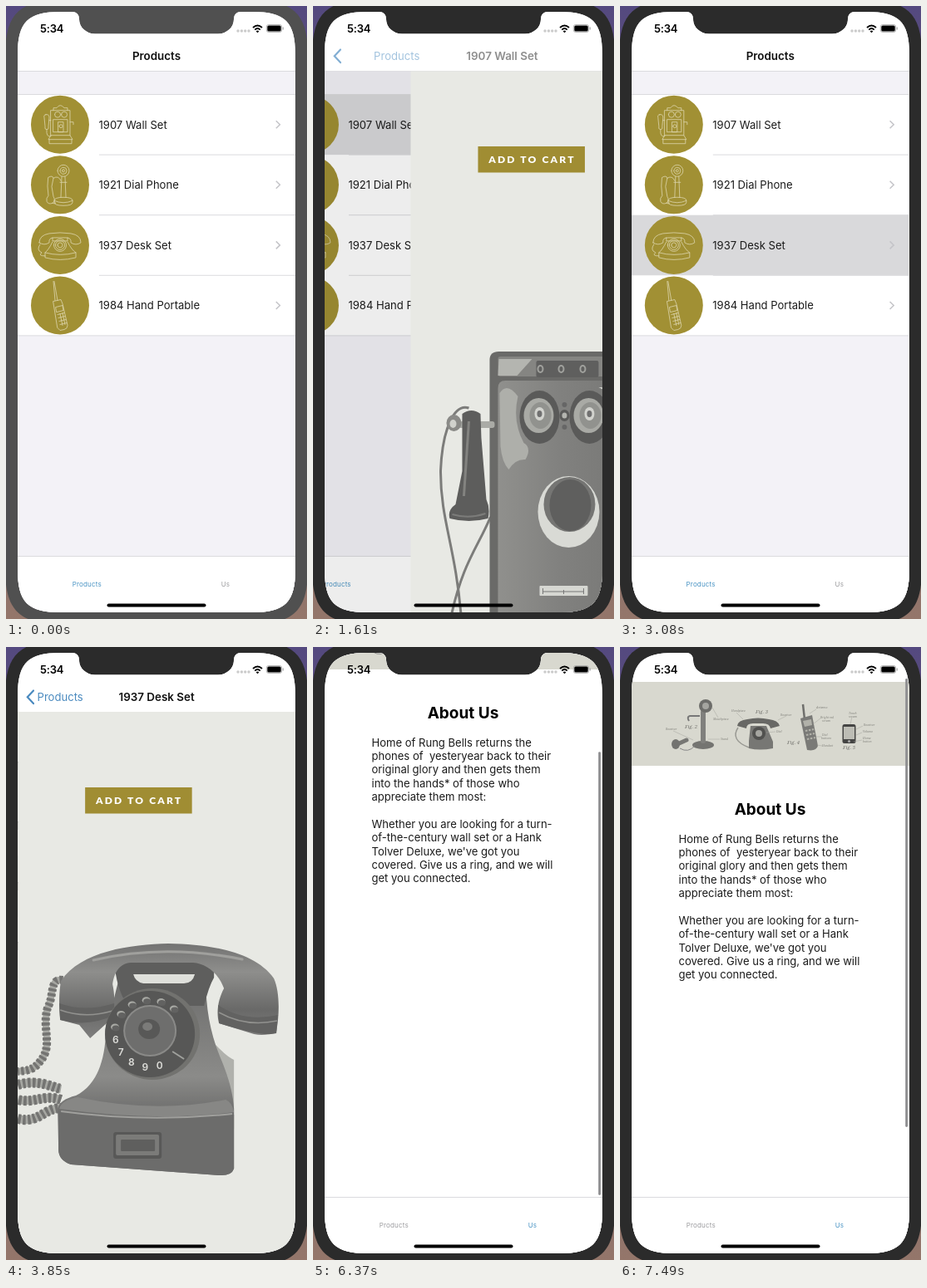
These frames come from a looping animation (362x738 px, 7560 ms). An HTML page:

```html
<!DOCTYPE html>
<html lang="en">
<head>
<meta charset="utf-8">
<title>Phone shop</title>
<style>
html, body { margin: 0; width: 100%; height: 100%; overflow: hidden; }
svg { display: block; width: 362px; height: 738px; }
text { font-family: Inter, Roboto, sans-serif; white-space: pre; }
.body { font-size: 13.05px; fill: #1b1b1b; }
.title { font-size: 13.4px; font-weight: 600; fill: #111; text-anchor: middle; }
.back { font-size: 13.1px; fill: #4a8abf; }
.head { font-size: 19px; font-weight: 700; text-anchor: middle; }
.tab { font-size: 8px; letter-spacing: .15px; text-anchor: middle; }
.clock { font-size: 13px; font-weight: 600; letter-spacing: -.2px; }
.cart { font: 900 12px Lato, sans-serif; letter-spacing: 2.2px; fill: #fff; text-anchor: middle; }
.digit { font-size: 12px; font-weight: 600; fill: #dcdcd8; text-anchor: middle; }
.note { font: italic 3.4px "Noto Serif", serif; fill: #85857f; }
.fig { font: italic 6px "Noto Serif", serif; fill: #73736e; }
.icon { fill: none; stroke: #ded6ae; stroke-width: .8; stroke-linejoin: round; stroke-linecap: round; }
.chev { fill: none; stroke: #c4c4c8; stroke-width: 1.5; }
.hair { stroke: #dbdbde; stroke-width: 1; }
.lead { fill: none; stroke: #a3a39c; stroke-width: .5; }
</style>
</head>
<body>
<svg viewBox="0 0 362 738" xmlns="http://www.w3.org/2000/svg">
<defs>
  <clipPath id="screen"><path d="M66 7H79Q88 7 88 16A19 17.500 0 0 0 107 33.500H255A19 17.500 0 0 0 274 16Q274 7 283 7H296C336 7 348 19 348 59V678C348 718 336 730 296 730H66C26 730 14 718 14 678V59C14 19 26 7 66 7Z"/></clipPath>
  <linearGradient id="desk" x2="0" y2="1"><stop stop-color="#54497f"/><stop offset="1" stop-color="#94766a"/></linearGradient>
  <linearGradient id="wood"><stop stop-color="#90908d"/><stop offset=".45" stop-color="#81817f"/><stop offset="1" stop-color="#777775"/></linearGradient>
  <linearGradient id="shell" x2="0" y2="1"><stop stop-color="#6c6c6b"/><stop offset=".5" stop-color="#8b8b89"/><stop offset=".68" stop-color="#6e6e6d"/><stop offset="1" stop-color="#757574"/></linearGradient>
  <linearGradient id="grip" x2="0" y2="1"><stop stop-color="#737372"/><stop offset=".3" stop-color="#8e8e8c"/><stop offset=".7" stop-color="#696968"/><stop offset="1" stop-color="#7e7e7d"/></linearGradient>
</defs>
<rect width="362" height="738" fill="url(#desk)"/>
<path id="bezel" d="M65 -7H297C346 -7 363 10 363 59V678C363 727 346 744 297 744H65C16 744 -1 727 -1 678V59C-1 10 16 -7 65 -7Z"/>
<g clip-path="url(#screen)">
  <rect width="362" height="738" fill="#fff"/>
  <g id="shop">
    <g id="home">
      <rect x="14" y="78" width="434" height="660" fill="#f3f2f7"/>
      <g id="list"></g>
      <g id="bar">
        <rect x="14" y="662" width="334" height="76" fill="#fff"/>
        <path class="hair" d="M14 662.500H348"/>
        <text id="tabA" class="tab" x="97.300" y="699">Products</text>
        <text id="tabB" class="tab" x="264" y="699">Us</text>
      </g>
      <rect id="dim" x="14" y="78" width="334" height="660"/>
    </g>
    <g id="wall"></g>
    <g id="rotary"></g>
    <rect x="14" y="0" width="334" height="78" fill="#fff"/>
    <path id="navLine" class="hair" d="M14 78.500H348"/>
    <text id="title" class="title" x="181" y="65">Products</text>
    <text id="item" class="title" x="181" y="65"></text>
    <text id="back" class="back" x="37.500" y="65">Products</text>
    <path id="arrow" d="M33 52.500L25.800 60.300L33 68.100" fill="none" stroke="#4a8abf" stroke-width="2.200" stroke-linecap="round"/>
  </g>
  <g id="about">
    <rect width="362" height="738" fill="#fff"/>
    <g id="page"></g>
    <rect id="thumb" x="343.200" width="2.800" rx="1.400" fill="#8f8f91"/>
    <g id="barCopy"></g>
  </g>
  <text class="clock" x="41" y="31.500">5:34</text>
  <g id="status"></g>
  <rect x="121.500" y="719.500" width="119" height="4" rx="2" fill="#000"/>
</g>
</svg>
<script>
const LOOP = 7560;
const $ = id => document.getElementById(id);
const fill = (id, markup) => { $(id).innerHTML = markup; };
const text = (cls, x, y, s) => `<text class="${cls}" x="${x}" y="${y}">${s}</text>`;
const ell = (x, y, rx, ry, c) => `<ellipse cx="${x}" cy="${y}" rx="${rx}" ry="${ry}" fill="${c}"/>`;
const box = (x, y, w, h, r, c) => `<rect x="${x}" y="${y}" width="${w}" height="${h}" rx="${r}" fill="${c}"/>`;
const path = (d, c) => `<path d="${d}" fill="${c}"/>`;
const line = (d, c, w, more = '') => `<path d="${d}" fill="none" stroke="${c}" stroke-width="${w}" ${more}/>`;
const ring = (x, y, r) => `M${x - r} ${y}a${r} ${r} 0 1 0 ${2 * r} 0a${r} ${r} 0 1 0 ${-2 * r} 0`;

// Product list
const ROW = 72.6, TOP = 106.5;
const icons = [
  'M-11 -17H12V13H-11ZM-8 -17V-20H-4Q0 -26 5 -20H9V-17M-8 -6H9V9H-8ZM-2 -3H4V9H-2ZM-11 13L-14 18H15L12 13M-13 18V23H14V18M-17 -12Q-20 -12 -19 -8L-18 2Q-19 6 -16 6Q-13 6 -14 2L-13 -8Q-13 -13 -17 -12ZM-13 -5H-11M-16 6Q-17 16 -11 14M12 -3H16V0' + ring(-3, -12, 3.5) + ring(5, -12, 3.5) + ring(1, 2, 2),
  'M2 -10L1 15M6 -10L7 15M-7 19Q-7 15 4 15Q15 15 15 19V21Q15 25 4 25Q-7 25 -7 21ZM-7 19Q4 24 15 19M0 -3H8M-14 -9Q-9 -12 -8 -8L-10 2L-8 14Q-5 19 -9 22Q-14 24 -16 20Q-17 16 -14 13L-15 2ZM-8 -8Q-2 -12 1 -5M-9 22Q-3 24 -7 20' + ring(4, -17, 7) + ring(4, -17, 4) + ring(4, -17, 1.5),
  'M-25 -3Q-25 -12 -13 -14Q0 -16 13 -14Q25 -12 25 -3Q19 1 13 -3Q14 -9 7 -9H-7Q-14 -9 -13 -3Q-19 1 -25 -3ZM-9 -9V-5H9V-9M-9 -4Q-14 6 -18 9V15Q0 20 19 15V9Q14 6 9 -4M-18 9Q0 14 19 9M-24 -1Q-29 6 -22 9Q-27 13 -18 13' + ring(0, 0, 7.5) + ring(0, 0, 3) + ring(0, 0, 5.5),
  'M-8 -29L-6 -6M-7 -29L-3 -6M-8 -5L1 -7L3 -2L9 24Q9 28 5 29L0 30L-3 27ZM-5 2L3 0L4 6L-4 8ZM-3 11L5 9M-2 15L6 13M-1 19L7 17M0 23L8 21M0 10L3 24M3 9L6 23'
];
const names = ['1907 Wall Set', '1921 Dial Phone', '1937 Desk Set', '1984 Hand Portable'];

const rowMarkup = (name, i) => {
  const y = TOP + ROW * i, mid = y + 36.2;
  return `<rect id="hl${i}" x="14" y="${y}" width="334" height="${ROW}" fill="#d9d9db"/>` +
    ell(65, mid, 35, 35, '#a19034') +
    `<path class="icon" d="${icons[i]}" transform="translate(65 ${mid})"/>` +
    text('body', 111.5, mid + 4.8, name) +
    `<path class="chev" d="M324.800 ${mid - 4.5}l4.600 4.500l-4.600 4.500"/>` +
    `<path class="hair" d="M${i < 3 ? 112 : 14} ${y + ROW}H348"/>`;
};
fill('list', box(14, TOP, 334, ROW * 4, 0, '#fff') + names.map(rowMarkup).join('') +
  `<path class="hair" d="M14 ${TOP}H348"/>`);

// Product pages
const sheet = art => box(14, 78, 334, 660, 0, '#e8e9e4') + art +
  box(95, 169, 128.5, 31.5, 0, '#a08d33') + text('cart', 160, 189.2, 'ADD TO CART');

const bell = x => ell(x, 495, 24, 32, '#5a5a59') + ell(x - 1, 493, 18, 21, '#a9aaa5') +
  ell(x + 1, 493, 13, 16, '#91928e') + ell(x, 491, 6, 8, '#d2d3ce') + ell(x, 491, 3, 4, '#707070');

fill('wall', sheet(
  line('M84 484C66 478 52 510 50 560C50 620 68 650 75 738', '#7c7c7a', 3) +
  line('M110 615C96 650 76 670 62 738', '#7c7c7a', 3) +
  line('M284 646L292 648', '#777', 4) + box(288, 643, 18, 12, 4, '#80807e') +
  path('M109 738V426Q109 416 120 416H273Q284 416 284 427V738Z', '#6a6a68') +
  box(119, 422, 160, 24, 3, '#858582') + path('M120 425H160L142 445H119Z', '#b4b5b0') +
  box(165, 427, 75, 20, 2, '#5f5f5e') +
  [170, 195, 221].map(x => ell(x, 437, 4, 5, '#a0a19d') + ell(x, 437, 2, 3, '#5f5f5e')).join('') +
  path('M119 738V460Q119 451 128 451H282V738Z', 'url(#wood)') +
  path('M121 466Q130 452 143 470Q136 500 150 526Q160 532 152 546Q140 545 132 558Q124 550 122 530Z', '#aeafaa') +
  path('M240 459L261 460V464L246 462Z', '#dcddd8') +
  bell(169) + bell(229) +
  ell(199, 493, 6, 7, '#5a5a59') + ell(199, 493, 3, 3.5, '#b4b5b0') +
  ell(199, 480, 3, 3, '#666') + ell(199, 507, 3, 3, '#666') +
  ell(204, 609, 37, 43, '#d9dad5') + ell(205, 600, 31, 33, '#757573') + ell(206, 601, 25, 31, '#5f5f5e') +
  box(169, 698, 58, 12, 1, '#d6d7d2') + line('M173 705H222M173 701V708M198 703V708M222 701V708', '#777', 1) +
  box(58, 500, 57, 8, 3, '#aaaba6') + ell(66, 502, 9, 10, '#8a8a87') + ell(65, 503, 4, 5, '#d0d1cc') +
  path('M76 491Q87 483 98 491L99 520L105 594Q110 605 107 617Q84 623 61 617Q58 607 68 600L76 560Z', '#5d5d5c') +
  line('M84 500L78 590', '#838380', 3) + line('M64 612Q84 618 104 611', '#7c7c7a', 2)
));

const coil = (d, w) => line(d, '#a6a7a2', w - 2) + line(d, '#747472', w, 'stroke-dasharray="3.500 2.500"');
const onDial = (deg, r) => {
  const a = deg * Math.PI / 180;
  return [173 + r * Math.cos(a), 466 + (r - 2) * Math.sin(a)];
};
const numeral = (s, i) => {
  const [x, y] = onDial(170 - i * 24, 42);
  return text('digit', x, y + 4, s);
};
const hole = (_, i) => {
  const [x, y] = onDial(192 + i * 24, 43);
  return ell(x, y, 5, 4, '#a9aaa5') + ell(x + 1, y + 1.5, 4.5, 3.5, '#626261');
};
fill('rotary', sheet(
  coil('M68 401C52 398 58 420 50 434C42 460 58 480 40 500C32 510 24 510 14 511', 10) +
  coil('M14 527C40 520 55 530 66 532', 12) + coil('M66 545C45 538 35 550 14 545', 12) +
  coil('M14 568C40 574 45 555 66 555', 12) +
  path('M238 465C255 482 264 492 274 497V580H236Z', '#b0b1ac') +
  path('M136 398H240C240 440 247 470 260 500C268 520 273 538 274 556V628Q271 637 256 636L78 623Q63 618 63 605L62 556Q64 545 84 540C108 528 119 500 120 462Z', 'url(#shell)') +
  path('M64 556Q66 546 86 542Q180 562 264 545Q272 548 274 560Q180 572 64 556Z', '#878785') +
  path('M64 560Q170 574 274 563V628Q271 637 256 636L78 623Q63 618 63 605Z', '#6c6c6b') +
  line('M66 559Q170 573 272 562', '#a0a09d', 2) +
  path('M130 378H250V398Q244 408 238 432H146Q132 410 130 378Z', '#5e5e5d') +
  path('M153 394H227Q224 405 214 405H165Q155 403 153 394Z', '#dfe0db') +
  path('M66 402C90 366 150 358 195 357C250 358 300 368 322 399C329 415 329 440 325 463Q312 469 298 466L256 453C252 438 256 422 262 411C255 392 240 381 225 380H150C136 381 130 392 128 406C132 424 130 440 122 452L101 471L88 455L65 449C63 430 64 412 66 402Z', 'url(#grip)') +
  path('M64 429Q95 440 130 429V443Q100 458 65 449Z', '#626261') +
  path('M255 431Q285 452 327 443L325 465Q310 470 256 453Z', '#626261') +
  line('M65 437Q95 448 128 438M256 440Q288 458 326 450', '#92928f', 1.5) +
  line('M105 377Q190 357 284 376', '#a0a09d', 3, 'stroke-linecap="round"') +
  ell(176, 466, 57, 55, '#72726f') + ell(173, 466, 54, 52, '#575756') +
  Array.from({ length: 6 }, hole).join('') + ['6', '7', '8', '9', '0'].map(numeral).join('') +
  ell(173, 462, 32, 31, '#8a8a88') + ell(173, 462, 30, 29, '#6e6e6d') +
  ell(172, 460, 13, 12, '#585857') + ell(170, 457, 6, 5, '#7b7b79') +
  line('M200 487L214 496', '#a0a19d', 2) +
  box(129, 584, 58, 32, 3, '#585857') + box(132, 587, 52, 25, 2, '#7b7b79') + box(138, 593, 41, 14, 1, '#5f5f5e')
));

// About page
const note = (x, y, s) => text('note', x, y, s);
const banner = box(14, 42, 334, 101, 0, '#d8d8cf') +
  ell(100, 118, 13, 5, '#747471') + box(97, 76, 6, 40, 2, '#80807d') + ell(103, 71, 8, 8, '#6d6d6a') +
  ell(103, 71, 4, 4, '#a5a5a0') + line('M96 83H84Q80 84 83 89', '#777', 2) +
  line('M69 117L80 112', '#777774', 5, 'stroke-linecap="round"') + ell(67, 117, 5, 6, '#737370') +
  line('M72 122Q82 128 90 119', '#888', 1) +
  path('M141 95Q142 88 153 87Q166 84 179 87Q190 88 192 95L181 98Q180 92 172 92H160Q152 92 152 98Z', '#686865') +
  path('M157 95H176L184 114V122Q168 125 155 122V113Z', '#777774') +
  ell(167, 104, 8, 8, '#51514f') + ell(167, 104, 4, 4, '#a5a5a0') +
  line('M142 97Q132 112 155 121', '#999993', 1.5) +
  line('M220 69L222 87', '#6f6f6c', 2.5) + path('M217 86L231 82L238 119Q236 126 225 124Z', '#7a7a77') +
  path('M220 89L230 87L231 94L222 96Z', '#b1b1a9') +
  line('M223 101L233 99M224 106L234 104M225 111L235 109', '#b1b1a9', 2, 'stroke-dasharray="2.500 1.500"') +
  box(267.5, 93, 16, 23, 2.5, '#444443') + box(269, 96, 13, 15, 0, '#bdbdb5') + ell(275.5, 113.5, 1.5, 1.5, '#aaa') +
  '<path class="lead" d="M111 73L118 85M88 112L64 101M106 111H120M148 87L140 79M190 88L200 83M176 103L187 102M228 80L236 75M232 93L241 86M236 108L242 108M237 118L243 119M277 93L279 84M284 99L292 95M284 106L291 103M281 114L291 112"/>' +
  text('fig', 78, 98, 'Fig. 2') + text('fig', 163, 80, 'Fig. 3') + text('fig', 201, 117, 'Fig. 4') + text('fig', 268, 123, 'Fig. 5') +
  note(55, 100, 'Receiver') + note(112, 88, 'Mouthpiece') + note(121, 112, 'Stand') +
  note(134, 78, 'Handpiece') + note(193, 83, 'Receiver') + note(188, 103, 'Dial') +
  note(236, 74, 'Antenna') + note(241, 86, 'Bright red') + note(243, 90, 'screen') +
  note(243, 107, 'Dial') + note(242, 111, 'buttons') + note(243, 120, 'Handset') +
  note(275, 81, 'Touch') + note(275, 85, 'screen') + note(293, 95, 'Receiver') +
  note(292, 103, 'Volume') + note(292, 111, 'Home') + note(292, 115, 'button');
const lines = [
  'Home of Rung Bells returns the', 'phones of  yesteryear back to their',
  'original glory and then gets them', 'into the hands* of those who', 'appreciate them most:', '',
  'Whether you are looking for a turn-', 'of-the-century wall set or a Hank',
  "Tolver Deluxe, we've got you", 'covered. Give us a ring, and we will', 'get you connected.'
];
fill('page', banner + text('head', 180.5, 201.7, 'About Us') +
  lines.map((s, i) => text('body', 70.5, 235.6 + 16.37 * i, s)).join(''));

const ON = '#4a94c4', OFF = '#9c9c9f';
$('tabA').setAttribute('fill', ON);
$('tabB').setAttribute('fill', OFF);
fill('barCopy', $('bar').innerHTML.replace(/ id="\w+"/g, '')
  .replace(ON, 'swap').replace(OFF, ON).replace('swap', OFF));

fill('status', [279, 283.4, 287.7, 292].map(x => ell(x, 30, 1.7, 1.7, '#cbcbcb')).join('') +
  line('M297 26Q302.500 21 308 26M299.300 28.600Q302.500 25.500 305.700 28.600', '#000', 1.9) +
  path('M302.500 32.200L300.700 30.400Q302.500 28.700 304.300 30.400Z', '#000') +
  '<rect x="313.300" y="22.500" width="18.400" height="9" rx="2.500" fill="none" stroke="#a5a5a5" stroke-width=".8"/>' +
  box(314.3, 23.5, 16.4, 7, 1.6, '#000') + box(332.6, 25.3, 1.2, 3.4, .6, '#a5a5a5'));

// Motion
const smooth = x => x * x * (3 - 2 * x);
const out = x => 1 - (1 - x) ** 3;
const clamp = x => Math.min(1, Math.max(0, x));
const settle = ms => ms <= 0 ? 0 : 1 - (1 + ms * .014) * Math.exp(-ms * .014);
const fade = (t, on, from, len) => t < on ? 0 : 1 - clamp((t - from) / len);
const track = (t, keys) => {
  let v = keys[0][1];
  for (let i = 1; i < keys.length; i++) {
    const [t0, v0] = keys[i - 1], [t1, v1, ease = smooth] = keys[i];
    if (t >= t0) v = v0 + (v1 - v0) * ease(clamp((t - t0) / (t1 - t0)));
  }
  return v;
};
const scrollKeys = [[5250, 0], [5850, 118], [6300, 116], [6400, 116], [6680, -30, out], [6850, -30], [7420, 0, out]];
const listShift = t => t < 560 ? track(t, [[300, 0], [560, -34]])
  : t > 1120 ? 0 : -34 * Math.exp((560 - t) / 123);

const move = (id, x, y = 0) => $(id).setAttribute('transform', `translate(${x.toFixed(2)} ${y.toFixed(2)})`);
const alpha = (id, a) => $(id).setAttribute('opacity', clamp(a).toFixed(3));
const show = (id, on) => $(id).setAttribute('display', on ? 'inline' : 'none');

function draw(t) {
  $('bezel').setAttribute('fill', t < 210 ? '#505050' : '#2b2b2b');
  const us = t >= 5040;
  show('shop', !us);
  show('about', us);

  const first = settle(t - 1440) - settle(t - 2480);
  const second = settle(t - 3130) - settle(t - 3970);
  const p = Math.max(first, second);
  move('list', 0, listShift(t));
  move('home', -100 * p);
  alpha('dim', .1 * p);
  alpha('hl0', fade(t, 1400, 2500, 400));
  alpha('hl2', fade(t, 3070, 3990, 400));
  alpha('hl1', 0);
  alpha('hl3', 0);
  show('wall', first > .001);
  show('rotary', second > .001);
  move('wall', 334 * (1 - first));
  move('rotary', 334 * (1 - second));

  $('item').textContent = names[t < 3050 ? 0 : 2];
  move('title', -115 * p);
  alpha('title', 1 - 1.6 * p);
  move('item', 150 * (1 - p));
  alpha('item', p * p);
  move('back', 115 * (1 - p));
  alpha('back', 1.6 * p - .6);
  alpha('arrow', p);
  alpha('navLine', 1 - p);

  const y = track(t, scrollKeys);
  const top = 38 + .76 * Math.max(0, y);
  const end = Math.min(660, 578 + (y > 0 ? .83 * y : y));
  move('page', 0, -y);
  $('thumb').setAttribute('y', top);
  $('thumb').setAttribute('height', end - top);
  alpha('thumb', (t - 5250) / 100);
}

const start = performance.now();
function tick() {
  draw((performance.now() - start) % LOOP);
  requestAnimationFrame(tick);
}
tick();
</script>
</body>
</html>
```
